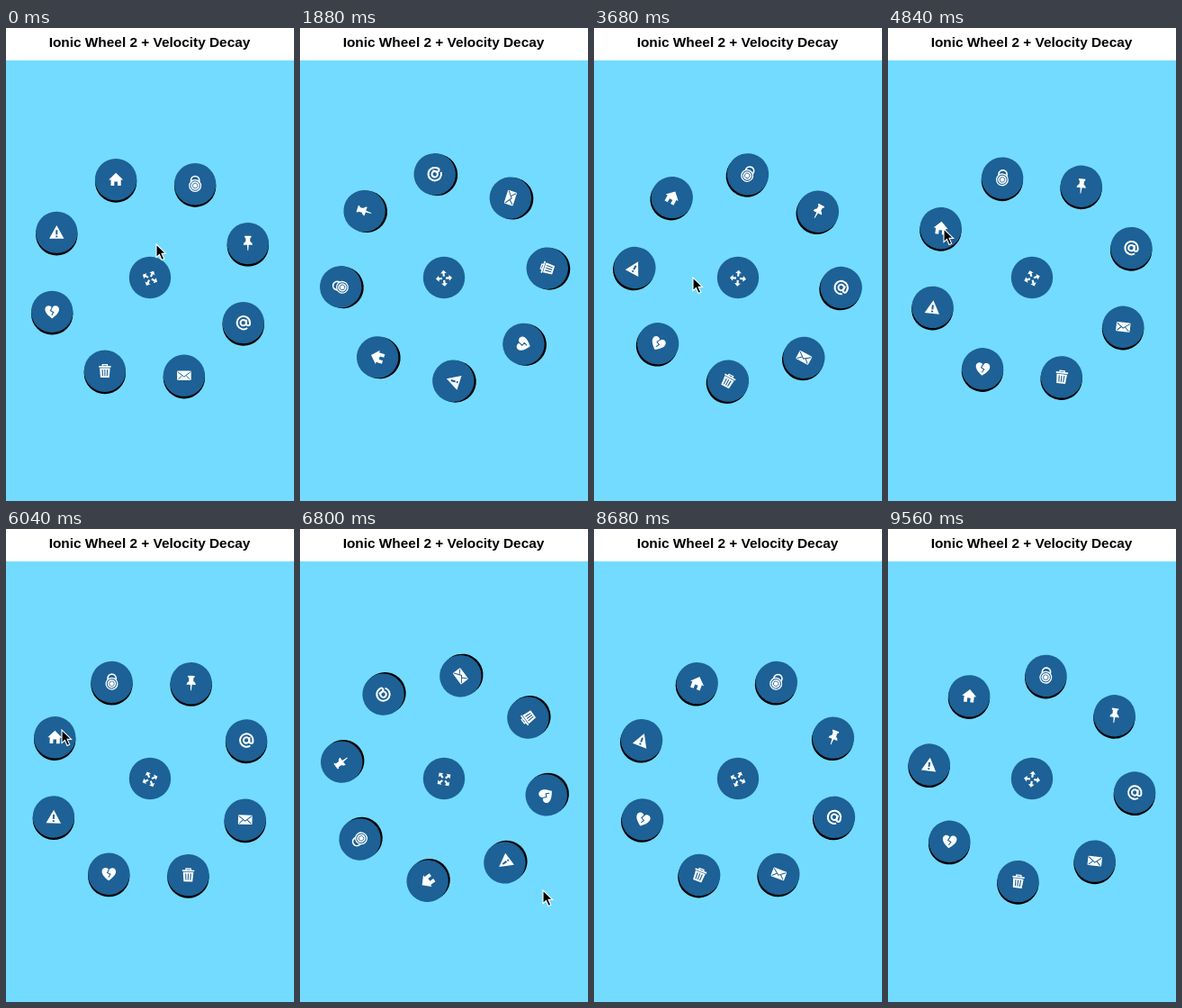
An HTML page for the animation above (9600 ms loop, 320 by 525 pixels).

```html
<!DOCTYPE html>
<html lang="en">
<head>
<meta charset="utf-8">
<title>Wheel</title>
<style>
  html, body { margin: 0; width: 100%; height: 100%; overflow: hidden; background: #73dbff; }
  svg { display: block; width: 100vw; height: 100vh; }
  text { font: bold 15.4px "Liberation Sans", Arial, sans-serif; }
  .ico { fill: #fff; stroke: none; }
  .line { fill: none; stroke: #fff; }
  .cut { fill: none; stroke: #1d6196; }
</style>
</head>
<body>
<svg viewBox="0 0 320 525" preserveAspectRatio="none">
  <defs>
    <g id="home"><path class="ico" d="M0-7.5 8 .2H5.6V6.8H1.8V2.2H-1.8V6.8H-5.6V.2H-8Z"/></g>
    <g id="lock">
      <circle class="line" cy="-4.2" r="4.6" stroke-width="1.7"/>
      <circle class="ico" cy="1.8" r="7"/>
      <circle class="cut" cy="1.8" r="5.2" stroke-width="1"/>
      <circle class="cut" cy="1.8" r="2.8" stroke-width=".8"/>
    </g>
    <g id="pin"><path class="ico" d="M-3.7-8.3H3.7V-6.6L2.5-6V-2.2Q5-1 5.2 1.6H.9L.4 8H-.4L-.9 1.6H-5.2Q-5-1-2.5-2.2V-6L-3.7-6.6Z"/></g>
    <g id="at" class="line" stroke-width="2">
      <circle r="3.2"/>
      <path d="M3.3-3.4V1.2a2 2 0 0 0 4 0V0A7.2 7.2 0 1 0 4.4 5.8"/>
    </g>
    <g id="mail">
      <rect class="ico" x="-7.8" y="-5.2" width="15.6" height="10.4" rx="1.2"/>
      <path class="cut" stroke-width="1" d="M-7-4 0 1.4 7-4M-6.5 4.2-2.4.2M6.5 4.2 2.4.2"/>
    </g>
    <g id="trash">
      <path class="line" stroke-width="1.3" d="M-2.6-5.2V-7H2.6V-5.2"/>
      <path class="ico" d="M-6.7-5.6H6.7V-3.9H-6.7ZM-5.8-3.2H5.8L4.9 7.2H-4.9Z"/>
      <path class="cut" stroke-width="1.1" d="M-2.8-1.6-2.4 5.5M0-1.6V5.5M2.8-1.6 2.4 5.5"/>
    </g>
    <g id="heart">
      <path class="ico" d="M0 7.6C-4 4.6-7.8 1.2-7.8-2.6C-7.8-7-2.2-8.2 0-4.4C2.2-8.2 7.8-7 7.8-2.6C7.8 1.2 4 4.6 0 7.6Z"/>
      <path class="cut" stroke-width="1.1" d="M.3-5.5-1.8-1.2 1.6.5-.4 4"/>
    </g>
    <g id="warn">
      <path class="ico" stroke-linejoin="round" d="M0-7.8 8.2 7H-8.2Z"/>
      <path class="cut" stroke-width="2" d="M0-2.6V2.5M0 3.7V5.5"/>
    </g>
  </defs>
  <rect width="320" height="525" fill="#73dbff"/>
  <rect width="320" height="36" fill="#fff"/>
  <text x="159.5" y="21.3" text-anchor="middle">Ionic Wheel 2 + Velocity Decay</text>
  <g id="wheel"></g>
  <circle cx="160" cy="277" r="23.2" fill="#1d6196"/>
  <g id="hub"></g>
  <path id="cursor" d="M0 0V14.6L3.4 11.5 6 17.4 8.7 16.2 6.1 10.4H10.6Z" fill="#000" stroke="#fff" stroke-width="1.1"/>
</svg>
<script>
const NS = "http://www.w3.org/2000/svg";
const LOOP = 9600, CX = 160, CY = 277, RADIUS = 115.2, DECAY = 1.285;
const $ = id => document.getElementById(id);

function add(parent, tag, attrs) {
  const el = document.createElementNS(NS, tag);
  for (const k in attrs) el.setAttribute(k, attrs[k]);
  return parent.appendChild(el);
}

const buttons = ["home", "lock", "pin", "at", "mail", "trash", "heart", "warn"].map(name => {
  const g = add($("wheel"), "g", {});
  add(g, "circle", { cy: 2.4, r: 23.2, fill: "#000" });
  add(g, "circle", { r: 23.2, fill: "#1d6196" });
  add(g, "use", { href: "#" + name });
  return g;
});

for (let a = 0; a < 360; a += 90)
  add($("hub"), "path", {
    class: "ico", transform: `rotate(${a})`,
    d: "M6.4-6.4V-1.6L4.8-3.2 2.2-.7.7-2.2 3.2-4.8 1.6-6.4Z"
  });

// Each drag turns the wheel with upright buttons; letting go spins one decaying turn.
const drags = [
  { start: 1460, end: 1707, from: -19.2, to: -68 },
  { start: 6200, end: 6463, from: -68, to: -44 }
];

// [time, x, y]
const path = [
  [0, 167, 240], [1400, 167, 240], [1800, 330, 442], [3150, 330, 442],
  [3550, 110, 277], [4100, 110, 277], [4600, 62, 223], [6200, 62, 223],
  [6560, 270, 401], [8350, 270, 401], [8700, 330, 403], [LOOP, 330, 403]
];

const smooth = p => p * p * (3 - 2 * p);

function pose(t) {
  let angle = drags[0].from, tilt = 0;
  for (const d of drags) {
    if (t < d.start) break;
    if (t < d.end) {
      const p = (t - d.start) / (d.end - d.start);
      angle += (d.to - angle) * p * p;
      tilt *= 1 - p;
    } else {
      tilt = 360 * Math.exp(-DECAY * (t - d.end) / 1000);
      angle = d.to + tilt;
    }
  }
  return { angle, tilt };
}

function pointer(t) {
  const i = path.findIndex(k => k[0] > t);
  const [t0, x0, y0] = path[i - 1], [t1, x1, y1] = path[i];
  const p = smooth((t - t0) / (t1 - t0));
  return [x0 + (x1 - x0) * p, y0 + (y1 - y0) * p];
}

function draw(t) {
  const { angle, tilt } = pose(t);
  buttons.forEach((b, i) => {
    const a = (angle + i * 45) * Math.PI / 180;
    const x = CX + RADIUS * Math.sin(a), y = CY - RADIUS * Math.cos(a);
    b.setAttribute("transform", `translate(${x} ${y}) rotate(${tilt})`);
  });
  $("hub").setAttribute("transform", `translate(${CX} ${CY + 0.8}) rotate(${angle})`);
  $("cursor").setAttribute("transform", `translate(${pointer(t)})`);
}

const begin = performance.now();
function tick() {
  draw((performance.now() - begin) % LOOP);
  requestAnimationFrame(tick);
}
tick();
</script>
</body>
</html>
```
